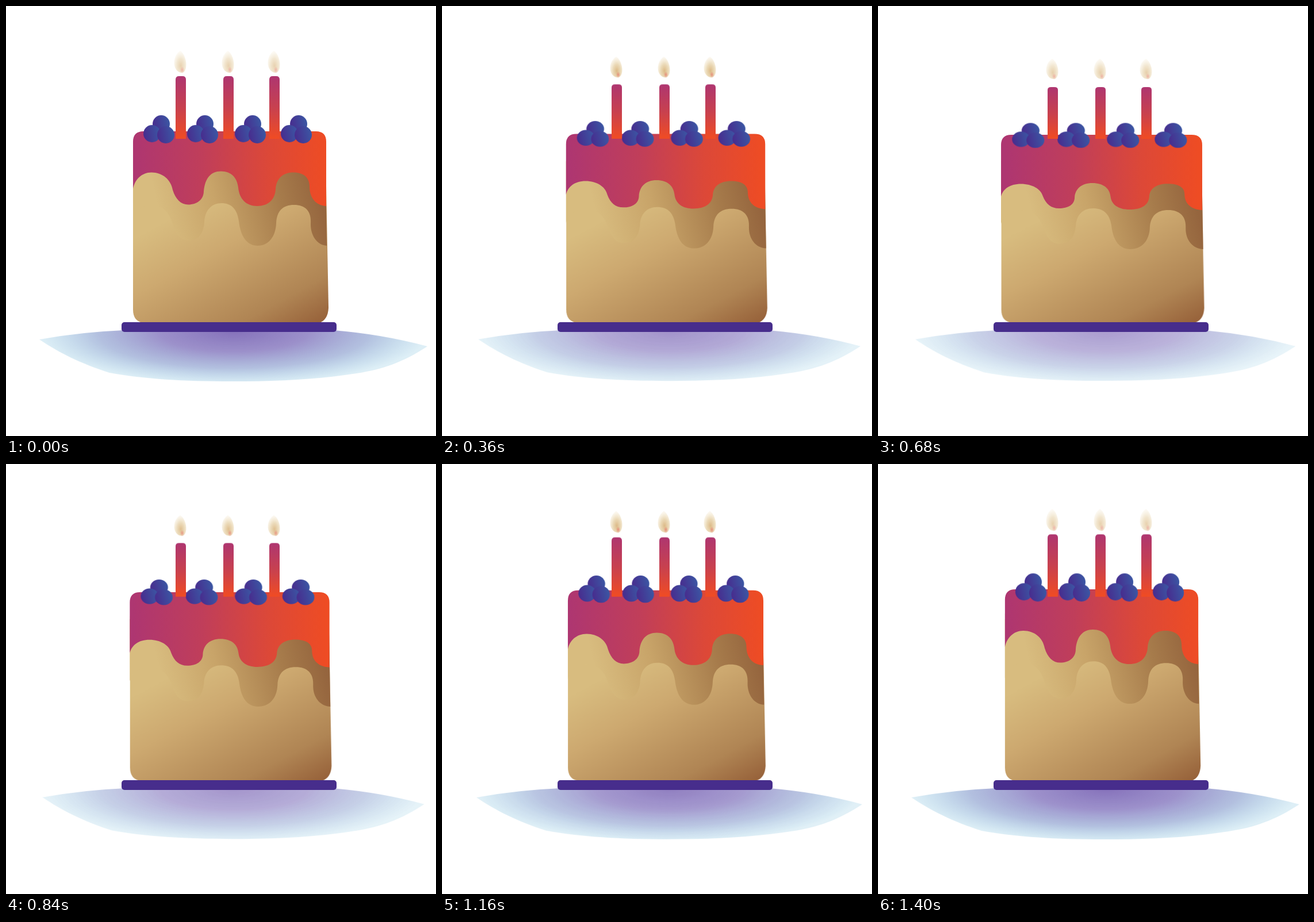
Recreate the animation shown at these times as an HTML page. Size 748 by 748 pixels, loop 1440 ms.

```html
<!DOCTYPE html>
<html lang="en">
<head>
<meta charset="utf-8">
<title>Bouncing cake</title>
<style>
  html, body { margin: 0; width: 100%; height: 100%; overflow: hidden; background: #fff; }
  svg { display: block; width: 100%; height: 100%; }

  .move { animation: 1440ms cubic-bezier(.333, .23, .667, 1) infinite; }
  .sponge  { animation-name: sponge;  transform-origin: 390px 551px; }
  .berries { animation-name: berries; transform-origin: 390px 239px; }
  .candles { animation-name: candles; transform-origin: 0 231px; }
  .flames  { animation-name: flames;  transform-origin: 0 116px; }
  .shadow  { animation-name: shadow;  transform-origin: 396px 570px; }
  .icing   { animation-name: icing; }
  .cream   { animation-name: cream; }
  .glow    { animation: glow 1440ms ease-in-out infinite; }

  /* The squash ends at 600 ms; the slower rise has its own easing. */
  @keyframes sponge {
    41.67% { transform: scale(1.04, .981); animation-timing-function: cubic-bezier(.333, .1, .667, .9); }
  }
  @keyframes berries {
    41.67% { transform: translateY(8.3px) scale(1.04, .882); animation-timing-function: cubic-bezier(.333, .1, .667, .9); }
  }
  @keyframes candles {
    41.67% { transform: scaleY(.8165); animation-timing-function: cubic-bezier(.333, .1, .667, .9); }
  }
  @keyframes flames {
    41.67% { transform: translateY(11.5px) scaleY(.92); animation-timing-function: cubic-bezier(.333, .1, .667, .9); }
  }
  @keyframes shadow {
    41.67% { transform: scale(.979, .988); opacity: .68; animation-timing-function: cubic-bezier(.333, .1, .667, .9); }
  }
  @keyframes glow {
    0%, 41.67%, 100% { opacity: .6; }
    17%, 71% { opacity: 1; }
  }
  @keyframes icing {
    41.67% {
      d: path("M213.7 332 C217 319 229 310.5 248.5 310.5 C268 310.5 283 319 286.5 331 C292 345 301 352.3 314.5 352.3 C331 352.3 342 346 342 333 C343 319 354 309 373 309 C392 309 403 318 404.5 332 C406 346 418 354.3 437.5 354.3 C458 354.3 471 347 472 332 C473 318 485 310.3 504 310.3 C523 310.3 533.5 316 533.5 328 C533.5 345 546 355 564.3 355.3 V242 Q564.3 224.3 546 224.3 H231.5 Q213.7 224.3 213.7 242 Z");
      animation-timing-function: cubic-bezier(.333, .1, .667, .9);
    }
  }
  @keyframes cream {
    41.67% {
      d: path("M213.7 270 H563.3 L566 423.4 C547 422.5 535.5 407 535.5 388 C537 366 525 355.4 505 355.4 C485 355.4 474 366 473 386 C472 410 458 423.4 439 423.4 C420 423.4 409 409 406 382 C403 362 392 352.5 374 352.5 C356 352.5 345 364 344 383 C342 405 331 414 316 414 C301 414 293 402 288 387 C282 367 269 355.6 249 355.6 C233 355.6 219 363 213.7 379 Z");
      animation-timing-function: cubic-bezier(.333, .1, .667, .9);
    }
  }
</style>
</head>
<body>
<svg viewBox="0 0 748 748" xmlns="http://www.w3.org/2000/svg">
  <defs>
    <linearGradient id="icingFill" gradientUnits="userSpaceOnUse" x1="221" y1="0" x2="557" y2="0">
      <stop offset="0" stop-color="#ae3671"/>
      <stop offset=".36" stop-color="#c03e5a"/>
      <stop offset=".7" stop-color="#dc4838"/>
      <stop offset="1" stop-color="#ee4c24"/>
    </linearGradient>
    <linearGradient id="creamFill" gradientUnits="userSpaceOnUse" x1="272" y1="380" x2="545" y2="312">
      <stop offset="0" stop-color="#d8bc7f"/>
      <stop offset=".35" stop-color="#c8a469"/>
      <stop offset=".75" stop-color="#a67b4b"/>
      <stop offset="1" stop-color="#95653e"/>
    </linearGradient>
    <linearGradient id="spongeFill" gradientUnits="userSpaceOnUse" x1="340" y1="340" x2="480" y2="594">
      <stop offset="0" stop-color="#d8bc7f"/>
      <stop offset=".3" stop-color="#cda970"/>
      <stop offset=".75" stop-color="#b08554"/>
      <stop offset="1" stop-color="#955f38"/>
    </linearGradient>
    <linearGradient id="candleFill" x1="0" y1="0" x2="0" y2="1">
      <stop offset="0" stop-color="#af3670"/>
      <stop offset=".5" stop-color="#c8414f"/>
      <stop offset="1" stop-color="#f14c23"/>
    </linearGradient>
    <linearGradient id="berryFill" x1="0" y1=".6" x2="1" y2=".4">
      <stop offset="0" stop-color="#482c8e"/>
      <stop offset="1" stop-color="#3b57a4"/>
    </linearGradient>
    <radialGradient id="flameFill" cx=".55" cy=".68" r=".62">
      <stop offset="0" stop-color="#cf9f58" stop-opacity=".8"/>
      <stop offset=".5" stop-color="#d9b878" stop-opacity=".6"/>
      <stop offset="1" stop-color="#e3c88f" stop-opacity=".18"/>
    </radialGradient>
    <radialGradient id="emberFill">
      <stop offset="0" stop-color="#e2504a" stop-opacity=".6"/>
      <stop offset="1" stop-color="#e2604a" stop-opacity="0"/>
    </radialGradient>
    <radialGradient id="shadowFill" gradientUnits="userSpaceOnUse" cx="0" cy="0" r="1"
        gradientTransform="translate(396 566) scale(340 92)">
      <stop offset="0" stop-color="#4c2f9a" stop-opacity=".68"/>
      <stop offset=".38" stop-color="#5440a4" stop-opacity=".58"/>
      <stop offset=".7" stop-color="#4a6ab4" stop-opacity=".42"/>
      <stop offset="1" stop-color="#3aa0cc" stop-opacity=".17"/>
    </radialGradient>

    <g id="bunch" fill="url(#berryFill)">
      <circle cx="16" cy="205" r="15"/>
      <circle cy="222" r="15"/>
      <circle cx="24" cy="224" r="15"/>
    </g>
    <path id="candle" fill="url(#candleFill)" d="M-9 231 V128 Q-9 122 -3 122 H3 Q9 122 9 128 V231 Z"/>
    <g id="flame">
      <path fill="url(#flameFill)" d="M-1 78 C6 82 9.500 94 9.500 102 C9.500 111 6 116 2 116 C-6 116 -11.500 108 -11.500 99 C-11.500 89 -7 82 -1 78 Z"/>
      <ellipse cx="2.500" cy="111" rx="4" ry="6" fill="url(#emberFill)"/>
    </g>
  </defs>

  <path class="move shadow" fill="url(#shadowFill)"
    d="M58 580 Q130 567 205 564 H570 Q655 571 733 592 C690 620 655 632 610 639 C540 650 470 653 392 653 C310 653 240 649 180 638 C130 622 92 603 58 580 Z"/>

  <path class="move sponge" fill="url(#spongeFill)"
    d="M221 260 H556 L561 525 Q560 546 545 551 H238 Q221 548 221 528 Z"/>
  <path class="move cream" fill="url(#creamFill)"
    d="M221 270 H556 L558 417 C540 416 530 398 530 380 C532 356 520 346 501 346 C482 346 471 356 470 378 C469 402 456 417 438 417 C420 417 408 402 405 374 C402 353 392 343 375 343 C357 343 346 356 345 375 C344 397 333 408 318 408 C303 408 295 396 290 380 C284 358 272 346 253 346 C237 346 225 355 221 372 Z"/>
  <path class="move icing" fill="url(#icingFill)"
    d="M221 318 C224 302 236 289.500 253 289.500 C272 289.500 287 302 290 320 C295 336 304 345.500 317 345.500 C332 345.500 344 337 344 322 C346 300 356 287.500 374 287.500 C392 287.500 402 299 404 316 C406 336 418 348 437 348 C456 348 468 337 469 319 C470 300 482 289.500 500 289.500 C518 289.500 528 299 528 314 C528 334 539 347 557 348 V236 Q557 218 539 218 H239 Q221 218 221 236 Z"/>

  <rect x="201" y="550" width="374" height="17" rx="5" fill="#472d8c"/>

  <g class="move berries">
    <use href="#bunch" x="254"/>
    <use href="#bunch" x="330"/>
    <use href="#bunch" x="413"/>
    <use href="#bunch" x="493"/>
  </g>
  <g class="move candles">
    <use href="#candle" x="304"/>
    <use href="#candle" x="387"/>
    <use href="#candle" x="467"/>
  </g>
  <g class="glow">
    <g class="move flames">
      <use href="#flame" x="304"/>
      <use href="#flame" x="387"/>
      <use href="#flame" x="467"/>
    </g>
  </g>
</svg>
</body>
</html>
```
